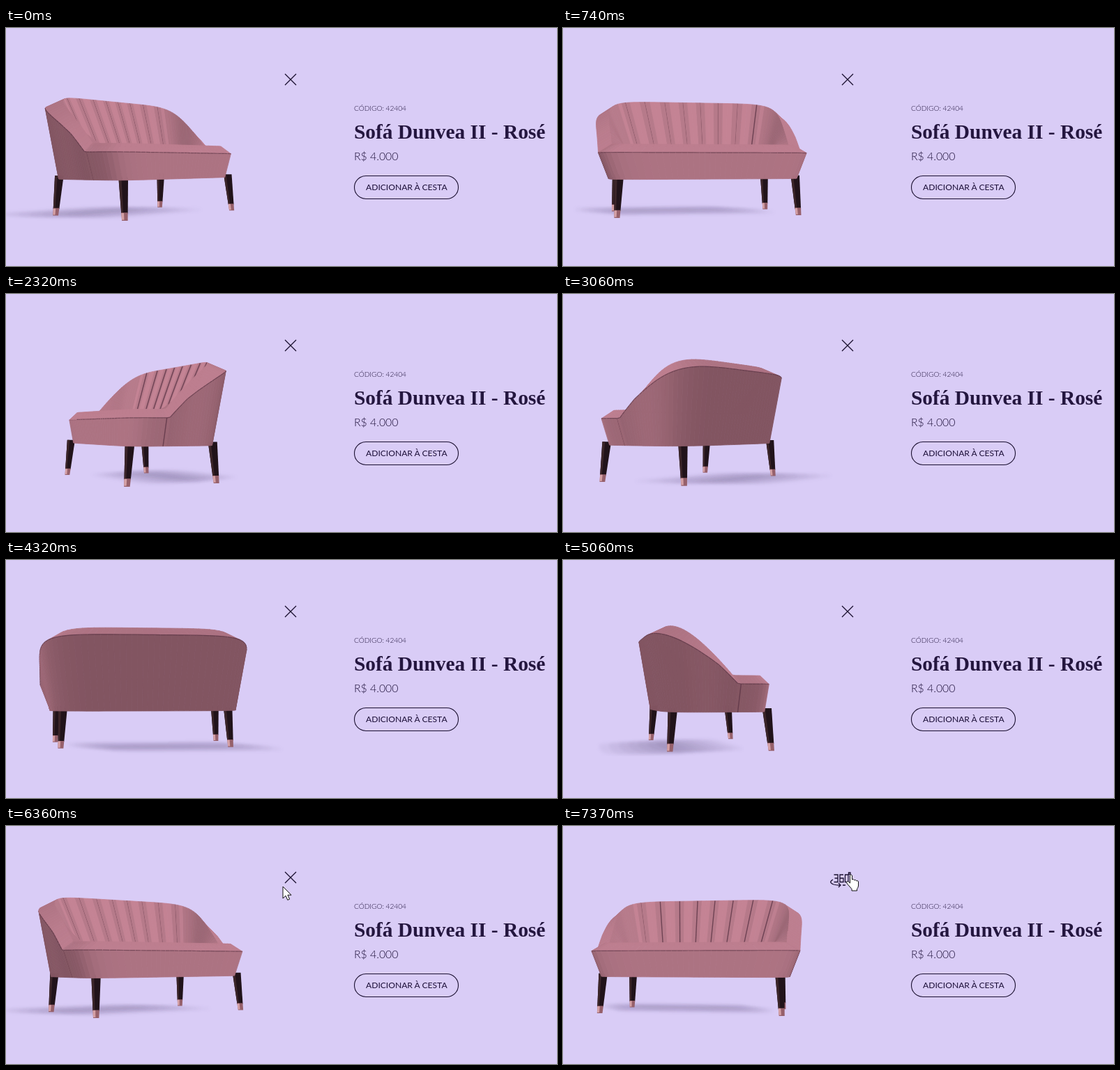
An HTML page with a canvas that plays this animation: 790x342 px, repeating every 8000 ms.

```html
<!DOCTYPE html>
<html lang="pt-BR">
<head>
<meta charset="utf-8">
<title>Sofá</title>
<style>
html, body { margin: 0; width: 100%; height: 100%; overflow: hidden; background: #d9ccf6; }
canvas, svg { position: absolute; left: 0; top: 0; }
text { font-family: Lato, sans-serif; font-weight: 300; fill: #1c0f38; }
.title { font: 700 29.4px "Liberation Serif", serif; fill: #24163f; }
.line { fill: none; stroke: #1b1030; stroke-width: 1.3; }
.pointer { fill: #fff; stroke: #111; stroke-width: 1; stroke-linejoin: round; }
</style>
</head>
<body>
<canvas id="stage" width="790" height="342"></canvas>
<svg width="790" height="342">
  <text x="499" y="119" font-size="10.1">CÓDIGO: 42404</text>
  <text x="499" y="159" class="title">Sofá Dunvea II - Rosé</text>
  <text x="499" y="190" font-size="15.8">R$ 4.000</text>
  <rect class="line" x="499.5" y="212.5" width="149" height="33" rx="16.5" style="stroke-width:1.1"/>
  <text x="516" y="233" font-size="12.1" style="font-weight:400">ADICIONAR À CESTA</text>
  <path id="cross" class="line" d="M400 66l16 16m0-16l-16 16"/>
  <g id="spin" class="line">
    <path d="M388.500 70h5.500v10.500h-5.500m1-5.500h4.500M402 70h-5v10.500h5v-5.500h-5M404.500 70h4.500v10.500h-4.500zM409.500 67h2.500v2.500h-2.500z"/>
    <path d="M387 77q-7 4 1 7q5 1.500 10 1m-3-3l3 3l-3 3M401 85h4"/>
  </g>
  <path id="arrow" class="pointer" d="M0 0V17L4 13.200 6.800 19.400 9.600 18.100 6.900 12.200H12Z"/>
  <path id="hand" class="pointer" d="M6 2Q7.500-.500 9 2V8q2-1.500 3 .8q2-1 3 .9q2.500-.6 3 1.300V17q-.5 3-2 4.500V24H8.500V21.500L2 14Q0 11.500 2 10.500Q3.500 10 6 13Z"/>
</svg>
<script>
const ctx = stage.getContext('2d');
const HORIZON = 193, CENTER = 195, DISTANCE = 1040, GROUND = -71.5, STEP = 67.4;
const HALF = 60, SEAM = 37, rad = Math.PI / 180;

// Superellipse plan, squarer at the front; column 0 is the back centre.
function plan(column, width, back, front) {
  const a = column * 180 / HALF * rad, s = Math.sin(a), c = Math.cos(a), n = c > 0 ? 4 : 7;
  const r = (Math.abs(s) ** n + Math.abs(c) ** n) ** (-1 / n);
  return [width * r * s, (c > 0 ? back : front) * r * c];
}

// Crest height: level along the back, sloping over the arms down to the seat.
function crestHeight(z) {
  const t = Math.max(0, Math.min(1, (z + 22) / 80));
  return 24 + 66 * (1 - (1 - t) ** 1.4);
}

// Rings hold [x, height, z].
const rings = { base: [], rim: [], crest: [], inner: [] };
for (let j = -HALF; j <= HALF; j++) {
  const [bx, bz] = plan(j, 131, 64, 71);
  const [rx, rz] = plan(j, 145, 81, 74);
  const [cx, cz] = plan(j, 127, 58, 66);
  const h = crestHeight(cz);
  rings.base.push([bx, -22.5, bz]);
  rings.rim.push([rx, h - 11, rz]);
  rings.crest.push([cx, h, cz]);
  rings.inner.push([cx * 0.85, 23, cz * 0.72 - 10]);
}

const light = [0.25, 0.5, -0.45];
function shade(p, tone) {
  const a = p[3].map((v, i) => v - p[0][i]), b = p[1].map((v, i) => v - p[0][i]);
  const n = [a[1] * b[2] - a[2] * b[1], a[2] * b[0] - a[0] * b[2], a[0] * b[1] - a[1] * b[0]];
  const k = n.reduce((s, v, i) => s + v * light[i], 0) / (Math.hypot(...n) || 1);
  const f = Math.max(0, Math.min(1, (k + 0.5) / 1.1));
  return `rgb(${[[138, 55], [90, 39], [103, 43]].map(([dark, span]) => Math.round((dark + span * f) * tone))})`;
}

const faces = [];
function addStrip(top, bottom, edge, hasSeam, tone) {
  for (let j = -HALF; j < HALF; j++) {
    const k = j + HALF;
    const p = [rings[top][k], rings[top][k + 1], rings[bottom][k + 1], rings[bottom][k]];
    faces.push({ p, color: shade(p, tone(j + 0.5)), edge, seam: hasSeam(j) });
  }
}
const isTuft = j => Math.abs(j) < 16 && Math.abs(j) % 4 === 2;
const foldTone = j => Math.abs(j) < 16 ? 0.98 + 0.05 * Math.cos(j * Math.PI / 2) : 0.95;
addStrip('rim', 'base', true, j => Math.abs(j) === SEAM, () => 0.94);
addStrip('crest', 'rim', false, () => false, () => 0.98);
addStrip('inner', 'crest', true, isTuft, foldTone);

let cos, sin;
const depthOf = ([x, , z]) => z * cos - x * sin;
function project(p) {
  const s = DISTANCE / (DISTANCE + depthOf(p));
  return [CENTER + (p[0] * cos + p[2] * sin) * s, HORIZON - p[1] * s, s];
}
function trace(points) {
  ctx.beginPath();
  points.forEach(p => ctx.lineTo(p[0], p[1]));
}
function fill(points, color) {
  trace(points);
  ctx.closePath();
  ctx.fillStyle = color;
  ctx.fill();
}
function line(points, color, width) {
  trace(points);
  ctx.strokeStyle = color;
  ctx.lineWidth = width;
  ctx.stroke();
}

function drawShadow() {
  ctx.save();
  ctx.beginPath();
  ctx.rect(0, 240, 404, 42);
  ctx.clip();
  ctx.filter = 'blur(2.5px)';
  for (let k = 0.1; k <= 1; k += 0.15) {
    fill(rings.base.map(([x, , z]) => project([x * 0.85 - 60 * k, GROUND, z * 0.75 + 95 * k])), 'rgba(88,78,115,.07)');
  }
  ctx.restore();
}

function drawLeg([x, , z]) {
  const top = project([x * 0.975, -18, z * 0.93]), foot = project([x, GROUND, z]);
  const cut = f => {
    const [cx, cy, s] = top.map((v, i) => v + (foot[i] - v) * f), w = (6 - 2.3 * f) * s;
    return [[cx - w, cy], [cx + w, cy]];
  };
  const band = (from, to, color, side = 1) => {
    const [a, b] = cut(from), [c, d] = cut(to);
    const narrow = (l, r) => [l[0] + (r[0] - l[0]) * side, l[1]];
    fill([a, narrow(a, b), narrow(c, d), c], color);
  };
  band(0, 0.85, '#21131a');
  band(0, 0.85, '#3b2529', 0.3);
  band(0.83, 1.02, '#96606b');
  band(0.84, 1, '#d4a0a5', 0.4);
}

const legs = [-1, 1].flatMap(side => [[side * 124, 0, -73], [side * 116, 0, 57]]);

function drawSofa(degrees) {
  cos = Math.cos(degrees * rad);
  sin = Math.sin(degrees * rad);
  drawShadow();
  legs.sort((a, b) => depthOf(b) - depthOf(a)).forEach(drawLeg);
  const depth = face => face.p.reduce((s, p) => s + depthOf(p), 0);
  faces.map(face => ({ ...face, d: depth(face), q: face.p.map(project) }))
    .filter(({ q }) => (q[2][0] - q[0][0]) * (q[3][1] - q[1][1]) < (q[2][1] - q[0][1]) * (q[3][0] - q[1][0]))
    .sort((a, b) => b.d - a.d)
    .forEach(({ q, color, edge, seam }) => {
      fill(q, color);
      line([...q, q[0]], color, 0.8);
      if (edge) line(q.slice(0, 2), 'rgba(82,45,62,.6)', 1.2);
      if (seam) line([q[0], q[3]], 'rgba(92,52,70,.8)', 1.4);
    });
}

function track(keys, t) {
  const i = Math.max(1, keys.findIndex(k => k[0] >= t));
  const [a, b] = [keys[i - 1], keys[i]], f = (t - a[0]) / (b[0] - a[0]);
  return a.slice(1).map((v, n) => v + (b[n + 1] - v) * f);
}
// [time, degrees] of each drag and pause, then [time, x, y] of the pointer.
const turn = [[0, -51], [1150, 16], [1450, 16], [1482, 20], [1690, 20], [3030, 124.5], [3200, 124.5],
  [4310, 173], [5050, 260], [5690, 302], [6335, 324], [7340, 371], [8000, 371]];
const mouse = [[0, 440, 215], [6130, 440, 215], [6330, 397, 87], [6430, 397, 87], [6570, 405.5, 69], [8000, 405.5, 69]];

function show(element, visible) {
  element.style.display = visible ? '' : 'none';
}
function render(now) {
  const t = Math.floor(now % 8000 / STEP) * STEP;
  ctx.clearRect(0, 0, 790, 342);
  drawSofa(track(turn, t)[0]);
  const [x, y] = track(mouse, t), spinning = t >= 6700, hovering = t >= 6500;
  show(cross, !spinning);
  show(spin, spinning);
  show(arrow, t >= 6130 && !hovering);
  show(hand, hovering);
  for (const pointer of [arrow, hand]) pointer.setAttribute('transform', `translate(${x} ${y})`);
  requestAnimationFrame(render);
}
requestAnimationFrame(render);
</script>
</body>
</html>
```
